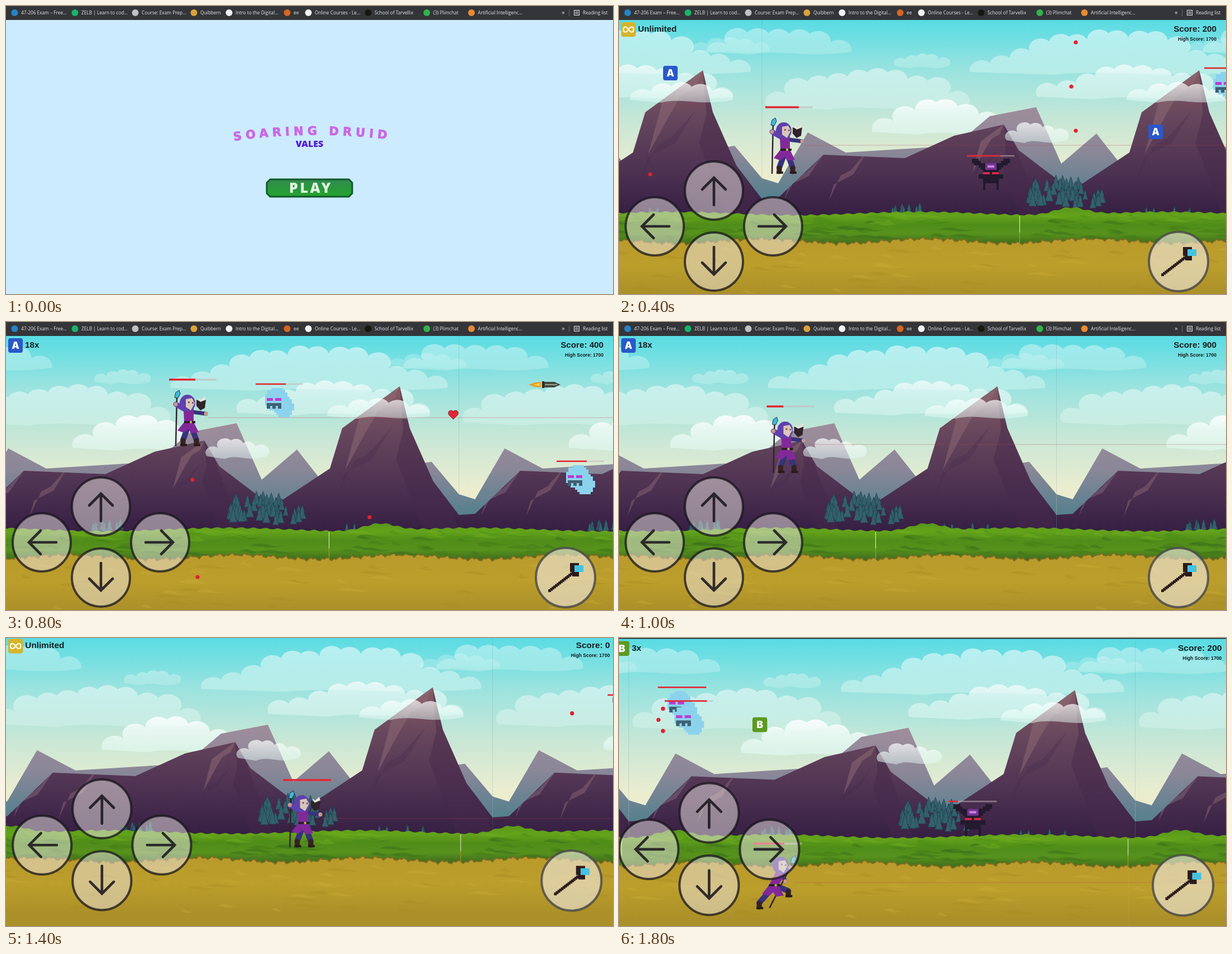
An HTML page that plays this animation: 1087x515 px, repeating every 2000 ms.

```html
<!DOCTYPE html>
<html lang="en">
<head>
<meta charset="utf-8">
<title>Side-scrolling game</title>
<style>
html, body { margin: 0; width: 100%; height: 100%; overflow: hidden; background: #26272b; }
svg { display: block; width: 100%; height: 100%; }
.hud { font: bold 15.2px "Liberation Sans", Arial, sans-serif; fill: #141d20; }
.small { font-size: 8.5px; }
.bar { font: 8.3px "Open Sans", sans-serif; fill: #e4e5e8; }
.title { font: bold 21px "DejaVu Sans", sans-serif; letter-spacing: 7px; fill: #c868e6; stroke: #c868e6; stroke-width: .9; }
.sub { font: 800 16px "Open Sans", sans-serif; fill: #5018dc; }
.play { font: 800 25px "Open Sans", sans-serif; letter-spacing: 3.6px; fill: #def6e0; }
.badge { font: 900 17px Inter, sans-serif; fill: #fff; text-anchor: middle; }
</style>
</head>
<body>
<svg id="stage" viewBox="0 0 1087 515" preserveAspectRatio="none"></svg>
<script>
const TILE = 889, STEP = 200;
const stage = document.getElementById('stage');

let seed = 7;
const rand = (a, b) => {
  seed = (seed * 16807) % 2147483647;
  return a + (b - a) * seed / 2147483647;
};
const times = (n, fn) => Array.from({ length: n }, (_, i) => fn(i)).join('');
const rect = (x, y, w, h, fill, more = '') =>
  `<rect x="${x}" y="${y}" width="${w}" height="${h}" fill="${fill}" ${more}/>`;
const circle = (x, y, r, fill, more = '') => `<circle cx="${x}" cy="${y}" r="${r}" fill="${fill}" ${more}/>`;
const path = (d, fill, more = '') => `<path d="${d}" fill="${fill}" ${more}/>`;
const line = (d, color, width, more = '') =>
  path(d, 'none', `stroke="${color}" stroke-width="${width}" ${more}`);
const text = (x, y, cls, str, more = '') => `<text x="${x}" y="${y}" class="${cls}" ${more}>${str}</text>`;
const at = (x, y, body) => `<g transform="translate(${x} ${y})">${body}</g>`;
const gradient = (id, y1, y2, ...colors) =>
  `<linearGradient id="${id}" gradientUnits="userSpaceOnUse" x1="0" x2="0" y1="${y1}" y2="${y2}">` +
  colors.map((c, i) => `<stop offset="${i / (colors.length - 1)}" stop-color="${c}"/>`).join('') + '</linearGradient>';

// Fills every cell of a pixel grid whose centre passes the test.
function pixels(w, h, cell, fill, test) {
  let d = '';
  for (let y = 0; y < h; y += cell)
    for (let x = 0; x < w; x += cell)
      if (test(x + cell / 2, y + cell / 2)) d += `M${x} ${y}h${cell}v${cell}h${-cell}z`;
  return path(d, fill);
}

// ---- scenery, one repeating tile per layer ----
function cloud(x, base, w, h, alpha) {
  const n = Math.max(5, Math.round(w / 36)), r = w / n * .6;
  let d = `M${x} ${base}`;
  for (let i = 1; i <= n; i++) {
    const top = h * .85 * Math.sin(Math.PI * i / n) * rand(.65, 1);
    d += `A${r} ${r * .8} 0 0 1 ${x + w * i / n} ${base - top}`;
  }
  return path(d + `q${-w * .2} 7 ${-w * .4} 3t${-w * .3} 2z`, 'url(#mist)', `opacity="${alpha}"`);
}

const tree = (x, y, h) => path(
  `M${x} ${y - h}l${h * .17} ${h * .5}h${-h * .06}l${h * .17} ${h * .5}h${-h * .56}l${h * .17} ${-h * .5}h${-h * .06}z`,
  '#33616b', 'stroke="#21404f" stroke-width=".7"');
const grove = (x, w, y1, y2, n, h) => times(n, i =>
  tree(x + rand(0, w), y1 + (y2 - y1) * i / n, h * rand(.75, 1.1)));

const ridge = points => `M0 375L${points}L${TILE} 375z`;
const backRidge = ridge('0 308 29 317 82 226 150 262 345 250 408 197 491 181 536 282 599 228 640 280 840 250 889 308');
const frontRidge = ridge('0 345 29 343 110 266 256 272 344 232 433 212 460 258 555 330 658 262 680 190 783 115 801 190 843 285 889 345');

// A jagged sliver of rock running from a summit towards (dx, dy).
const sliver = (x, y, dx, dy, color) => path(
  `M${x} ${y}l${dx * .45} ${dy * .4} ${dx * .25} ${dy * .1} ${dx * .3} ${dy * .5} ${-dx * .12} ${-dy * .32} ${-dx * .5} ${-dy * .2}z`, color);
const slope = (x, y, h) =>
  path(`M${x} ${y}l${-h * .55} ${h * .4} ${-h * .2} ${h * .75} ${h * .3} ${-h * .55} ${h * .15} ${-h * .25} ${h * .2} ${-h * .12}z`, '#8f6d76', 'opacity=".5"') +
  path(`M${x} ${y}l${h * .05} ${h * .6} ${-h * .1} ${h * .4} ${h * .45} ${h * 1.2} ${h * .5} 0 ${-h * .7} ${-h * 1.9}z`, '#452949', 'opacity=".45"') +
  sliver(x - h * .1, y + h * .55, -h * .75, h * .95, '#452b4b55');

const scenery =
  cloud(-100, 82, 260, 54, .4) + cloud(763, 80, 140, 26, .25) + cloud(373, 118, 495, 92, .55) +
  cloud(238, 107, 97, 24, .35) + cloud(10, 180, 358, 95, .48) + cloud(493, 162, 345, 72, .65) +
  cloud(198, 225, 266, 66, .85) +
  line('M0 25V312', '#5f7d80', 1, 'opacity=".4" stroke-dasharray="1 1"') +
  path(backRidge, 'url(#haze)') + path(frontRidge, 'url(#rock)') +
  '<g clip-path="url(#rocks)">' + slope(783, 115, 130) + slope(433, 212, 75) +
  sliver(190, 258, -70, 90, '#85637288') + sliver(110, 266, -70, 80, '#846c8077') + '</g>' +
  cloud(653, 168, 184, 38, .72) + cloud(438, 240, 107, 36, .72) +
  grove(480, 92, 326, 360, 34, 25) + grove(549, 60, 346, 364, 15, 23) +
  grove(194, 90, 371, 374, 9, 18) + grove(660, 140, 372, 375, 5, 15);

function meadow() {
  const wave = (x, k, p = 0) => Math.sin(x / TILE * 2 * Math.PI * k + p);
  const top = x => 371 + 3 * wave(x, 2, 1) + 1.2 * wave(x, 41) - 13 * Math.exp(-(((x - 90) / 40) ** 2));
  const bottom = x => 419 + 4 * wave(x, 3, 2) + 2 * wave(x, 37) + 1.8 * wave(x, 83);
  let upper = '', lower = '';
  for (let x = 0; x <= TILE; x += 4) {
    upper += `L${x} ${top(x).toFixed(1)}`;
    lower += `L${TILE - 1 - x} ${bottom(TILE - 1 - x).toFixed(1)}`;
  }
  const blotches = (y1, y2, colors, n, alpha) => times(n, i => {
    const x = rand(5, 810), y = rand(y1, y2), w = rand(20, 75);
    return path(`M${x} ${y}q${w * .25} -7 ${w * .5} -2t${w * .5} 1q${-w * .3} 6 ${-w * .6} 3z`,
      colors[i % colors.length], `opacity="${alpha}"`);
  });
  const turf = upper.slice(1) + lower;
  return rect(0, 405, TILE + .5, 145, 'url(#sand)') +
    blotches(430, 512, ['#a58921', '#c9ad38'], 36, .35) +
    line('M' + lower.slice(1), '#806c20', 4) + path(`M${turf}z`, 'url(#grass)') +
    blotches(384, 416, ['#39701a', '#447d17'], 44, .5) + blotches(374, 390, ['#72ad20', '#4a8c17'], 30, .45);
}

const defs = '<defs>' +
  gradient('sky', 25, 300, '#58dce3', '#9be3df', '#c9e7d6', '#ecedcf') +
  gradient('haze', 180, 345, '#9f8d9b', '#8a8798', '#54808d') +
  gradient('rock', 115, 370, '#855d64', '#66465c', '#503453', '#372044') +
  gradient('grass', 358, 424, '#57951a', '#63a31a', '#508c19', '#56921c', '#3f6e1d') +
  gradient('sand', 412, 515, '#b99a2b', '#bb9e2b', '#ab9029') +
  gradient('leaf', 309, 342, '#318a50', '#23a52c') +
  '<linearGradient id="mist" x1="0" x2="0" y1="0" y2="1"><stop offset="0" stop-color="#fff"/><stop offset="1" stop-color="#e4fbf5" stop-opacity=".65"/></linearGradient>' +
  `<clipPath id="rocks">${path(frontRidge, '#000')}</clipPath>` +
  '<path id="arc" d="M408 241Q545 221 690 239"/>' +
  `<g id="scenery">${scenery}</g><g id="meadow">${meadow()}</g></defs>`;

const tiled = (id, offset) => [-1, 0, 1].map(k =>
  `<use href="#${id}" x="${offset % TILE + k * TILE}"/>`).join('');

// ---- actors, placed by the left end of their life bar ----
const lifeBar = (x, y, red, w = 85, h = 2.5) =>
  rect(x, y - h / 2, w, h, '#c6b5b8', 'opacity=".55"') + rect(x, y - h / 2, red, h, '#e3232f');

function bat(x, y, red, w) {
  const part = (color, test) => pixels(68, 54, 4, color, (px, py) => test(Math.abs(px - 34), py));
  return lifeBar(x, y, red, w) + at(x + 9, y + 5,
    part('#231a2d', (a, py) => a > 14
      ? Math.abs(py + a * .6 - 22) < 6 || (a < 22 && py > 27 && py < 35)
      : py > 8 && (py < 43 || a > 8)) +
    part('#753494', (a, py) => a < 12 && py > 9 && py < 19) +
    part('#ca83da', (a, py) => a < 7 && py > 13 && py < 17) +
    part('#d92845', (a, py) => a > 3 && a < 13 && py > 23 && py < 29));
}

const ghost = (x, y, red) => lifeBar(x, y, red) + at(x + 17, y + 7,
  pixels(52, 51, 4, '#8bd3ed', (px, py) => Math.hypot(px - 21, py - 21) < 21.5 || Math.hypot(px - 33, py - 34) < 18.5) +
  [3, 18].map(px => rect(px, 18, 11, 5, '#bd3bd2')).join('') +
  rect(3, 27, 26, 5, '#3f6070') + times(3, i => rect(3 + i * 10, 31, 6, 6, '#3f6070')));

const poses = {
  stand: { head: [33, 42], hip: [37, 76], hands: [[12, 44], [66, 61]], feet: [[25, 117], [49, 117]], staff: [[12, 119], [14, 30]] },
  fly: { head: [47, 38], hip: [37, 73], hands: [[64, 42], [56, 66]], feet: [[10, 113], [61, 92]], staff: [[28, 113], [69, 32]] }
};

function figure({ head: [hx, hy], hip: [px, py], hands, feet, staff: [butt, tip] }) {
  const limb = (a, b, color, w) => line(`M${a}L${b}`, color, w, 'stroke-linecap="round"');
  const shoulder = [hx + 2, hy + 15];
  return line(`M${butt}L${tip}`, '#33232e', 2.5) +
    path(`M${tip}m-4 2l2-9 6-4 2 6-4 8z`, '#3fb9dc', 'stroke="#243446"') +
    feet.map(([fx, fy]) => limb([px, py], [fx, fy - 9], '#38327c', 10) +
      limb([fx, fy - 8], [fx, fy - 2], '#36221f', 9) + rect(fx - 5, fy - 2, 12, 4, '#2a1b1b')).join('') +
    limb(shoulder, hands[0], '#6041ac', 9) + limb(shoulder, hands[1], '#37347b', 7) +
    hands.map(([x, y]) => circle(x, y, 3.5, '#c99a86')).join('') +
    path(`M${hx - 7} ${hy + 10}h18L${px + 7} ${py}l9 18-14 2-4-8-8 7-12-4 12-15z`, '#82299a') +
    rect(px - 10, py - 2, 20, 4, '#281d2a') + rect(px, py - 2, 4, 4, '#c8a35a') +
    `<ellipse cx="${hx}" cy="${hy}" rx="14" ry="15" fill="#5f40ad"/>` +
    path(`M${hx - 3} ${hy - 7}l11-2 5 9-7 13-9-6z`, '#d8c6ba') +
    rect(hx + 1, hy - 3, 3, 3, '#7d5b62') + rect(hx + 8, hy - 2, 3, 3, '#7d5b62');
}
const raven = path('M49 36l7 3 10-3-2 15-8 4-7-8z', '#30232b') + path('M51 33l6 3 7-6 2 6-10 4z', '#e8e1da');

const hero = ({ x, y, red }, flies) =>
  line(`M${x + 70} ${y + 68}H1100`, '#b8404c', .8, 'opacity=".45"') + lifeBar(x, y, red, 85, 3.4) +
  at(x, y, figure(flies ? poses.fly : poses.stand) + (flies ? '' : raven));

const dot = (x, y) => circle(x, y, 3.6, '#e4202f');
const volley = (x, y, spread) => times(3, i => dot(x + 8 * Math.abs(i - 1), y + (i - 1) * spread));
const heart = (x, y) => path(`M${x} ${y + 8}l-8-8q-3-7 4-8 4 0 4 4 0-4 4-4 7 1 4 8z`, '#e32632', 'stroke="#8e2430"');
const missile = (x, y) => at(x, y,
  path('M0 0L12-4 22-5V5L11 4z', '#e99b25') + path('M8 0l12-3v6z', '#f6cf45') +
  rect(24, -6, 4, 12, '#292c2b') + path('M28-5H46L57 0 46 5H28z', '#444a42') + line('M29 0H51', '#97a18b', 2));

const badgeColors = { A: '#2a58c9', B: '#5b9b22', '∞': '#d4b42d' };
const badge = (kind, x, y) => rect(x - 13, y - 13, 26, 26, badgeColors[kind], 'rx="4"') +
  (kind === '∞'
    ? line(`M${x} ${y}c-4-6-9-6-9 0s5 6 9 0 9-6 9 0-5 6-9 0z`, '#fbf4cf', 2.5)
    : text(x, y + 6.2, 'badge', kind));

// ---- overlays ----
const pad = (x, y, turn) =>
  circle(x, y, 52, '#eee8e6', 'fill-opacity=".5" stroke="#16131a" stroke-opacity=".75" stroke-width="4"') +
  `<g transform="translate(${x} ${y}) rotate(${turn})">` +
  line('M0 26V-23M-21-2L0-23 21-2', '#17121a', 4.6, 'opacity=".85" stroke-linecap="round"') + '</g>';
const wand = times(17, i => rect(971 + i * 3, 478 - i * 2.3, 5, 5, '#2c1c1c')) +
  at(1010, 431, pixels(20, 24, 4, '#2c1c1c', (x, y) => Math.abs(x - 8) < 7 && (x > 5 || y < 16)) +
    pixels(24, 24, 4, '#45c2e1', (x, y) => Math.hypot(x - 16, y - 10) < 8));
const controls = pad(170, 330, 0) + pad(276, 394, 90) + pad(170, 457, 180) + pad(64, 394, 270) +
  circle(1002, 457, 53, '#eee6d8', 'fill-opacity=".65" stroke="#474748" stroke-opacity=".8" stroke-width="4"') + wand;

const bookmark = (x, color, label) => circle(x - 11.5, 12, 6, color) + text(x, 15, 'bar', label);
const toolbar = rect(0, 0, 1087, 25, '#343539') +
  bookmark(27, '#2585c7', '47-206 Exam – Free...') + bookmark(135, '#17b46b', 'ZELB | Learn to cod...') +
  bookmark(243, '#bfc0c2', 'Course: Exam Prep...') + bookmark(348, '#dda33a', 'Quibbern') +
  bookmark(411, '#f1f3f4', 'Intro to the Digital...') + bookmark(515, '#d9651f', 'ee') +
  bookmark(553, '#f4f4f4', 'Online Courses - Le...') + bookmark(660, '#17170f', 'School of Tarvellix') +
  bookmark(765, '#2fb54a', '(3) Plimchat') + bookmark(845, '#e88a32', 'Artificial Intelligenc...') +
  text(995, 15, 'bar', '»', 'style="font-size:11px"') + rect(1008, 6, 1, 12, '#66686c') +
  rect(1017.5, 7.5, 9, 9, 'none', 'stroke="#e4e5e8"') +
  times(3, i => rect(1019, 9.6 + i * 2, 6, .8, '#e4e5e8')) + text(1033, 15, 'bar', 'Reading list');

const menu = rect(0, 0, 1087, 515, '#cdebff') +
  '<text class="title"><textPath href="#arc">SOARING DRUID</textPath></text>' +
  text(543.5, 251.5, 'sub', 'VALES', 'text-anchor="middle"') +
  path('M473 310H614L620 316V335L614 341H473L467 335V316z', 'url(#leaf)', 'stroke="#10592d" stroke-width="3" stroke-linejoin="round"') +
  text(507, 334, 'play', 'PLAY') + toolbar;

// ---- scenes ----
const unlimited = ['∞', 'Unlimited'];
const start = { sky: 466, land: 475, hero: { x: 342, y: 312, red: 85 }, ammo: unlimited, score: 100,
  extra: badge('A', 737, 120) + bat(572, 185, 9, 9) + ghost(718, 178, 80) + volley(214, 211, 198) };
const climb = { sky: 256 + TILE, land: 718, hero: { x: 262, y: 181, red: 60 }, ammo: unlimited, score: 200,
  extra: badge('A', 92, 120) + badge('A', 961, 225) + bat(623, 268, 60) + ghost(1048, 111, 85) +
    dot(56, 301) + volley(810, 144, 79) };
const soar = { sky: 811, land: 579, hero: { x: 292, y: 103, red: 47 }, ammo: ['A', '18x'], score: 400,
  extra: heart(801, 166) + ghost(447, 111, 54) + ghost(986, 249, 54) + missile(936, 112) +
    dot(334, 282) + dot(343, 456) + dot(651, 349) };
const sink = { sky: 756, land: 341, hero: { x: 237, y: 199, red: 13 }, ammo: ['A', '10x'], score: 1400,
  extra: badge('B', 503, 358) + missile(652, 233) + dot(926, 145) + volley(1048, 265, 31.5) };
const retry = { sky: 862, land: 806, hero: { x: 491, y: 279, red: 85 }, ammo: unlimited, score: 0,
  view: [1.0107, 0, -28], extra: bat(1066, 128.6, 85) + dot(1003, 161) };
const dive = { sky: 918, land: 906, hero: { x: 248, y: 384, red: 54 }, flies: true, ammo: ['B', '3x'], score: 200,
  view: [1.02, -12, -24], extra: ghost(80, 110, 85) + ghost(92, 134, 74) + bat(590, 310, 17) +
    badge('B', 259, 175.5) + volley(81, 167, 19.5) };

const mean = (a, b) => (a + b) / 2;
const between = (a, b) => ({
  ...a, extra: '', sky: mean(a.sky, b.sky), land: mean(a.land, b.land), score: mean(a.score, b.score),
  hero: { x: mean(a.hero.x, b.hero.x), y: mean(a.hero.y, b.hero.y), red: mean(a.hero.red, b.hero.red) }
});

function game({ sky, land, hero: wizard, flies, ammo: [kind, amount], score, view, extra }) {
  const [scale, dx, dy] = view || [1, 0, 0];
  return `<g transform="translate(${dx} ${dy}) scale(${scale})">` +
    rect(0, 25, 1087, 520, 'url(#sky)') + tiled('scenery', sky) + tiled('meadow', land) +
    extra + hero(wizard, flies) + controls + badge(kind, 17, 42) + text(34, 46, 'hud', amount) +
    text(1070, 46, 'hud', `Score: ${score}`, 'text-anchor="end"') +
    text(1070, 61.5, 'hud small', 'High Score: 1700', 'text-anchor="end"') + '</g>' + (view ? '' : toolbar);
}

const pictures = [menu, ...[start, climb, between(climb, soar), soar, between(soar, sink), sink,
  retry, between(retry, dive), dive].map(game)];

stage.innerHTML = defs + '<g id="picture"></g>';
const picture = document.getElementById('picture');
let shown = -1;

function render(now) {
  const step = Math.floor(now / STEP) % pictures.length;
  if (step !== shown) picture.innerHTML = pictures[shown = step];
}
function tick() {
  render(performance.now());
  requestAnimationFrame(tick);
}
tick();
</script>
</body>
</html>
```
